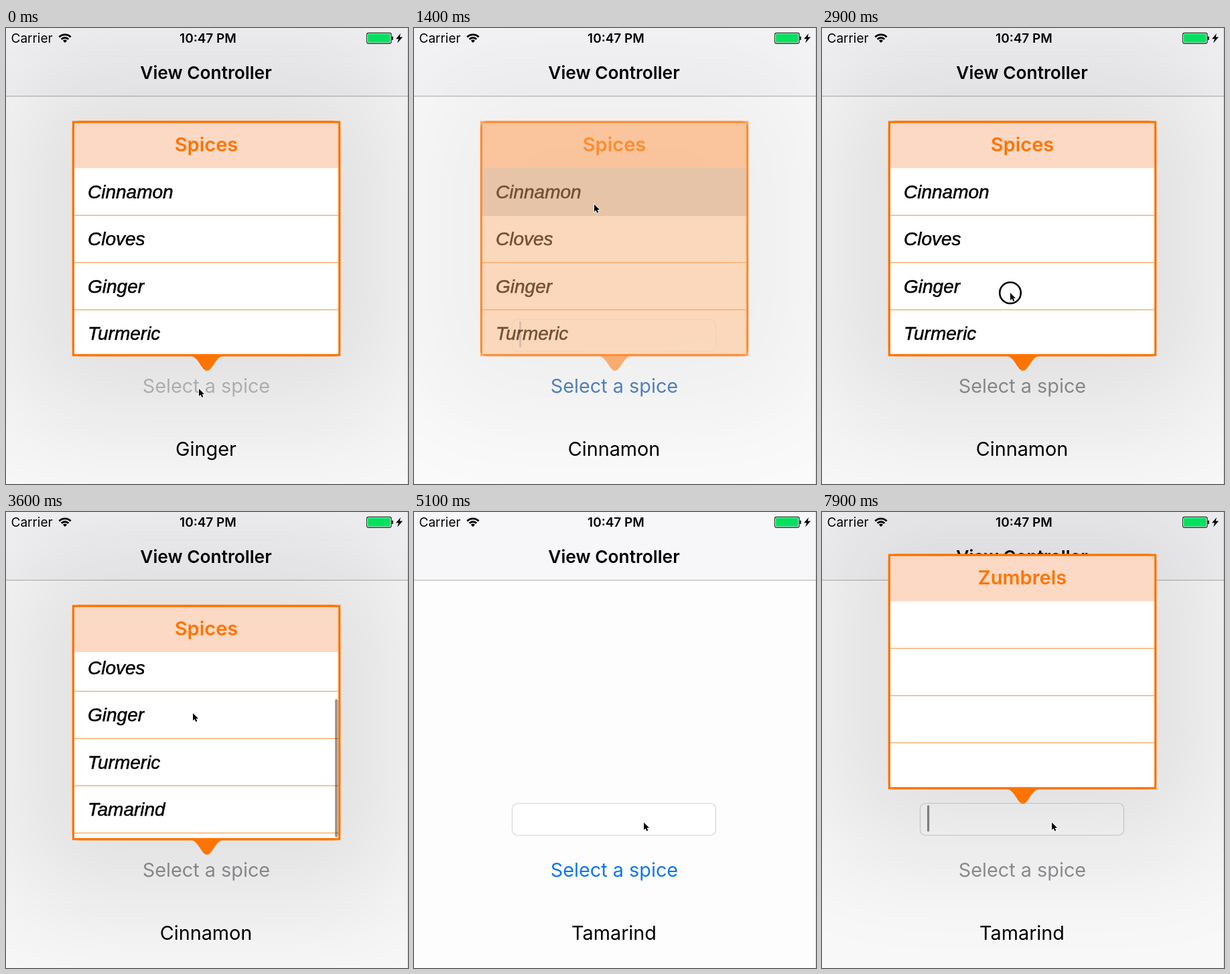
These frames come from a looping animation (600 by 680 pixels, 8000 ms). An HTML page:

```html
<!DOCTYPE html>
<html lang="en">
<head>
<meta charset="utf-8">
<title>Spice picker</title>
<style>
  html, body { margin: 0; width: 100%; height: 100%; overflow: hidden; background: #fefdfe; }
  svg { display: block; width: 600px; height: 680px; font-family: Inter, Roboto, sans-serif; }
  .mid { text-anchor: middle; }
  .status { font-size: 19px; }
  .semi { font-weight: 600; }
  .big { font-size: 28.8px; }
  .row { font: italic 28px "Liberation Sans", Arial, sans-serif; stroke: #000; stroke-width: .5px; }
</style>
</head>
<body>
<svg viewBox="0 0 600 680">
  <defs>
    <filter id="blur" filterUnits="userSpaceOnUse" x="-300" y="-300" width="1200" height="1300">
      <feGaussianBlur stdDeviation="88"/>
    </filter>
    <clipPath id="list"><rect x="100" y="209" width="398" height="279"/></clipPath>
  </defs>

  <rect width="600" height="680" fill="#fefdfe"/>
  <rect width="600" height="101" fill="#f7f6f9"/>
  <rect y="101" width="600" height="1.3" fill="#bdbcc0"/>
  <text class="semi mid" x="298.5" y="76" font-size="26.3">View Controller</text>

  <rect x="146.5" y="434.5" width="304" height="47.5" rx="8" fill="#fff" stroke="#d2d2da" stroke-width="1.2"/>
  <rect id="caret" x="157" y="437.5" width="3.2" height="39" rx="1"/>
  <text id="button" class="big mid" x="299" y="544">Select a spice</text>
  <text id="label" class="big mid" x="298.5" y="638"></text>
  <rect x="599" width="1" height="680" opacity=".12"/>

  <g id="dim" fill="#0c0810">
    <rect width="600" height="680" opacity=".02"/>
    <rect id="shadow" x="4" y="44" width="590" height="540" opacity=".095" filter="url(#blur)"/>
  </g>

  <text class="status" x="7.5" y="22">Carrier</text>
  <g fill="none" stroke="#000" stroke-width="2.8">
    <path d="M79.4 13.4A12.2 12.2 0 0 1 96.6 13.4M82.7 16.7A7.5 7.5 0 0 1 93.3 16.7"/>
    <path d="M88 22L84.9 18.9A4.4 4.4 0 0 1 91.1 18.9Z" fill="#000" stroke="none"/>
  </g>
  <text class="status semi mid" x="301.5" y="22">10:47 PM</text>
  <rect x="538.5" y="7.5" width="36.5" height="15.5" rx="2.5" fill="#fff" stroke="#333" stroke-width="1.3"/>
  <rect x="540" y="9" width="33.5" height="12.5" rx="1" fill="#04e05f"/>
  <rect x="575.5" y="12.5" width="2.3" height="5.5" rx="1" fill="#222"/>
  <path d="M589 8L582 16.2H586L584 22.5 592 13.4H587.6Z"/>

  <g id="popover">
    <g id="back" fill="#ff7300">
      <rect x="98.8" y="138.6" width="400.4" height="350.8" rx="10"/>
      <path d="M274 489C288 489 291 511 300 511S312 489 326 489Z"/>
    </g>
    <g id="content">
      <rect x="100" y="140" width="398" height="69" fill="#fcd9c4"/>
      <text id="heading" class="semi mid" x="299" y="184" font-size="29" fill="#ff7300"></text>
      <g clip-path="url(#list)">
        <rect x="100" y="209" width="398" height="279" fill="#fff"/>
        <g id="rows"></g>
        <rect id="bar" x="491" y="279" width="4.4" height="206" rx="2.2" fill="#000"/>
      </g>
      <rect x="100.4" y="140.2" width="397.2" height="347.6" fill="none" stroke="#ff7300" stroke-width="3.2"/>
    </g>
  </g>

  <g id="pointer">
    <circle id="ring" r="15.8" fill="none" stroke="#000" stroke-width="2.6"/>
    <path d="M0 0V11L2.6 8.8 4.3 12.8 6.3 12 4.6 8.1H8Z" stroke="#fff" stroke-width="1.4" paint-order="stroke"/>
  </g>
</svg>
<script>
const LOOP = 8000, PITCH = 70.4, TAP = 200, GLIDE = 500;

// Moments at which the pointer presses something
const pickFirst = 1010, openList = 2200, drag = 2900, pickLast = 4120, focusField = 6050;

const stops = [
  { at: 0, x: 288, y: 538 },
  { at: 900, x: 269, y: 263 },
  { at: 2050, x: 294, y: 534 },
  { at: drag, x: 281, y: 395 },
  { at: drag + GLIDE, x: 279, y: 300 },
  { at: 4100, x: 216, y: 438 },
  { at: 5050, x: 343, y: 463 },
];

const $ = id => document.getElementById(id);
const spices = ['Cinnamon', 'Cloves', 'Ginger', 'Turmeric', 'Tamarind'];
const eachRow = make => spices.map((name, i) => make(i * PITCH, name)).join('');

$('rows').innerHTML =
  eachRow(y => `<rect x="100" y="${y + 278.7}" width="398" height="1.4" fill="#f5ac69"/>`) +
  '<rect id="picked" x="100" width="398" height="72" fill="#d9d9d9"/>' +
  '<g id="names">' + eachRow((y, name) => `<text class="row" x="122" y="${y + 254}">${name}</text>`) + '</g>';

// Smooth step from 0 to 1
function ramp(t, from, length) {
  const p = Math.min(1, Math.max(0, (t - from) / length));
  return p * p * (3 - 2 * p);
}

const set = (id, name, value) => $(id).setAttribute(name, value);
const show = (id, on) => set(id, 'visibility', on ? 'inherit' : 'hidden');
const mix = (a, b, p) => `rgb(${a.map((v, i) => Math.round(v + (b[i] - v) * p))})`;
const during = (t, from, length) => t >= from && t < from + length;
const opened = (t, tap) => ramp(t, tap + TAP, 260);
const closed = (t, tap) => ramp(t, tap + TAP, 400);

function movePointer(t) {
  let { x, y } = stops[0];
  for (const stop of stops) {
    const p = ramp(t, stop.at - GLIDE, GLIDE);
    x += (stop.x - x) * p;
    y += (stop.y - y) * p;
  }
  set('pointer', 'transform', `translate(${x} ${y})`);
  const tapped = [pickFirst, openList, pickLast, focusField].some(tap => during(t, tap, TAP));
  show('ring', tapped || during(t, drag, GLIDE));
}

function draw(t) {
  const shown = 1 - closed(t, pickFirst) + opened(t, openList) - closed(t, pickLast) + opened(t, focusField);
  const onField = t > focusField;
  const lift = `translate(0 ${onField ? -76 : 0})`;

  for (const id of ['dim', 'back', 'content']) set(id, 'opacity', shown);
  for (const id of ['popover', 'shadow']) set(id, 'transform', lift);
  $('heading').textContent = onField ? 'Zumbrels' : 'Spices';
  show('names', !onField);

  // Drag past the end of the list, then settle back
  const scroll = onField ? 0 : 83 * ramp(t, drag, 600) - 11 * ramp(t, drag + 650, 350);
  set('rows', 'transform', `translate(0 ${-scroll})`);
  set('bar', 'opacity', .4 * (ramp(t, drag, 100) - ramp(t, drag + 1000, 300)));

  const last = t > openList;
  show('picked', !onField && t > (last ? pickLast : pickFirst) + TAP / 2);
  set('picked', 'y', 208.2 + (last ? 4 * PITCH : 0));
  $('label').textContent = t < pickFirst + TAP ? 'Ginger' : t < pickLast + TAP ? 'Cinnamon' : 'Tamarind';

  const released = t < openList + TAP ? -150 : openList + TAP;
  set('button', 'opacity', .4 + .6 * ramp(t, released, 400));
  set('button', 'fill', mix([10, 118, 245], [146, 146, 149], shown));
  set('caret', 'fill', mix([65, 88, 220], [136, 136, 138], shown));
  show('caret', t % 1000 >= 250);

  movePointer(t);
}

const start = performance.now();
function tick() {
  draw((performance.now() - start) % LOOP);
  requestAnimationFrame(tick);
}
tick();
</script>
</body>
</html>
```
